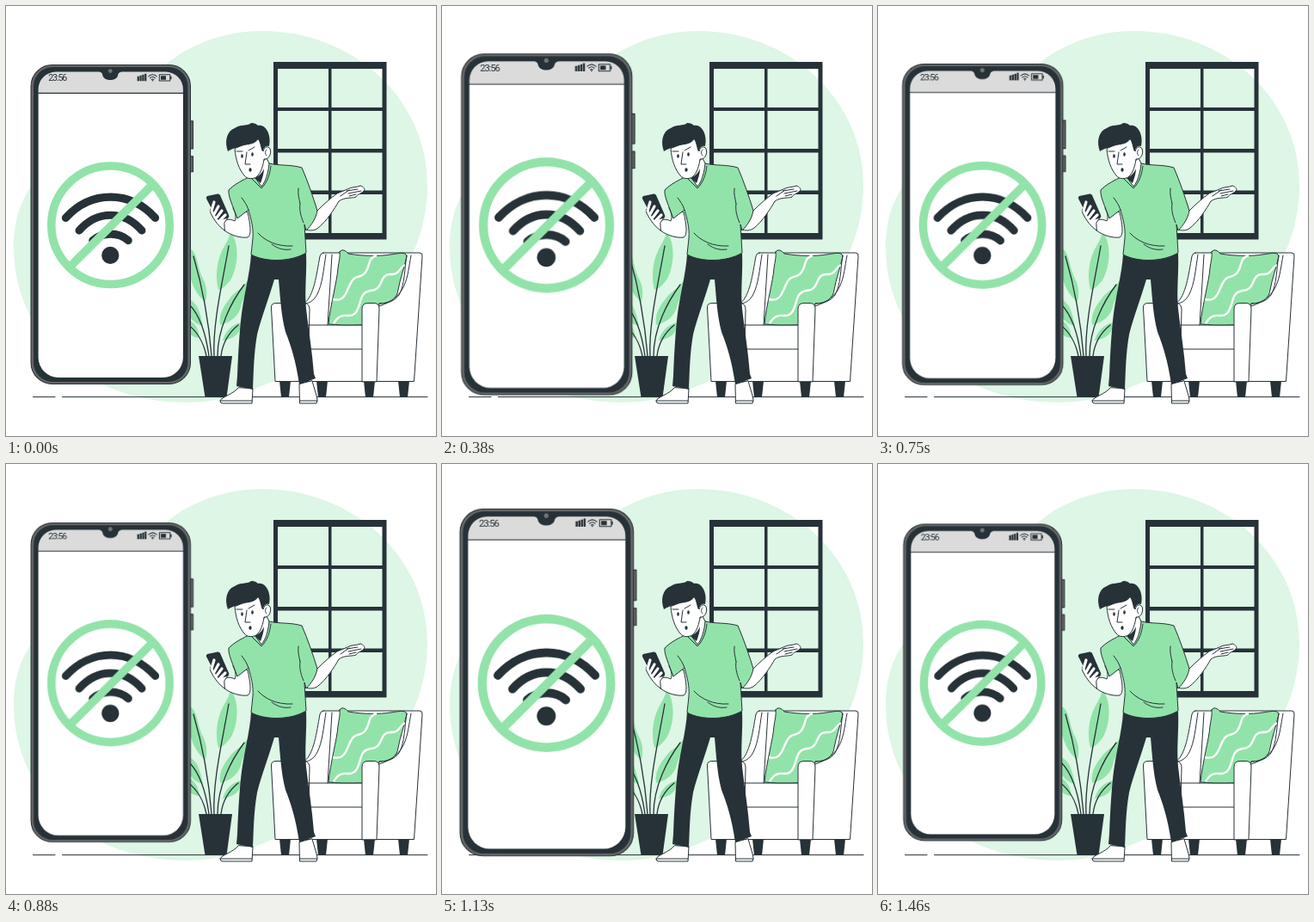
An HTML page that plays this animation: 500x500 px, repeating every 1.5 s.

```html
<!DOCTYPE html>
<html lang="en">
<head>
<meta charset="utf-8">
<title>No connection</title>
<style>
  html, body { margin: 0; width: 100%; height: 100%; overflow: hidden; background: #fff; }
  svg { display: block; width: 100vw; height: 100vh; }
  .g { fill: #92e3a9; }
  .d { fill: #263238; }
  .w { fill: #fff; }
  .o { stroke: #263238; stroke-width: 1; stroke-linejoin: round; stroke-linecap: round; }
  .l { fill: none; stroke: #263238; stroke-width: 1; stroke-linecap: round; stroke-linejoin: round; }
  .stem { stroke-width: 1.3; }
  .wave { fill: none; stroke: #fff; stroke-width: 2.4; }
  .finger { fill: none; stroke: #fff; stroke-width: 3.2; stroke-linecap: round; }
  .signal { fill: none; stroke: #263238; stroke-width: 9; stroke-linecap: round; }
  .ban { fill: none; stroke: #92e3a9; stroke-width: 9.5; }
  #phone { transform-origin: 121.5px 254px; }
  text { font: 10.5px Roboto, sans-serif; font-stretch: 75%; letter-spacing: -1.1px; fill: #263238; }
</style>
</head>
<body>
<svg viewBox="0 0 500 500">
  <path fill="#def6e5" d="M9 280C9 245 20 212 48 190C110 145 155 87 205 54C235 37 265 29 297 29C404 29 490 108 490 208C490 305 420 378 330 426C290 448 250 461 210 461C90 461 9 380 9 280Z"/>
  <path class="l" d="M31.500 454.600H57M65.500 454.600H490"/>

  <path id="window" class="d" fill-rule="evenodd" d="M311 65H442.500V271.500H311ZM316 73H375V118H316ZM378.500 73H437.500V118H378.500ZM316 122H375V166H316ZM378.500 122H437.500V166H378.500ZM316 170.500H375V214.500H316ZM378.500 170.500H437.500V214.500H378.500ZM316 219H375V264H316ZM378.500 219H437.500V264H378.500Z"/>

  <g id="plant">
    <g class="g">
      <path d="M261 262C271 275 271 300 262 317C256 326 250 330 247 330C243 315 245 296 252 283C256 275 260 270 261 262Z"/>
      <path d="M213 281C224 288 222 304 229 317C234 326 234 336 232 344C221 336 215 322 212 306Z"/>
      <path d="M282 318C283 332 275 340 273 350C270 361 261 368 249 371C247 357 254 348 261 339C267 331 275 329 282 318Z"/>
      <path d="M212 341C223 344 226 358 229 372C219 370 213 362 208 352Z"/>
      <path d="M211 365C219 367 224 375 225 386C218 386 213 382 208 374Z"/>
      <path d="M273 368C274 379 268 386 252 389C255 378 262 371 273 368Z"/>
    </g>
    <path class="l stem" d="M242 407C240 370 252 320 259 279M239 407C236 370 228 325 218 291M246 407C246 375 262 344 277 324M236 407C232 378 224 358 213 347M233 407C230 392 222 378 211 370M250 407C252 390 260 379 270 371"/>
    <path class="d" d="M224 407H263L256.500 455H231.500Z"/>
  </g>

  <g id="chair">
    <path class="d" d="M318 436H331L329 455H320ZM361 436H374L372 455H363ZM416 436H429L427 455H418ZM456 436H469L467 455H458Z"/>
    <path class="w o" d="M369 287H481Q484.500 287 484 291L474.500 436.500H313L308.500 351Q308 345.500 314 345.500H347C358 337 361 313 365 291Q366 287 369 287Z"/>
    <path class="l" d="M372 289C369 308 368 323 362 335C358 343 352 346 347 346M379 289L374 371M348 371H414M353 399H414M471 290C466 316 467 338 434 349"/>
    <path class="g o" d="M388 286C390 282 395 284 398 288C415 291 435 291 447 289C456 288 465 285 466 291C463 305 458 318 456 330C455 340 446 346 434 346L430 371C412 370 396 372 375 370C377 348 385 320 386 305C387 297 389 291 388 286Z"/>
    <path class="wave" d="M380 341C395 345 396 330 401 322C406 311 414 318 419 308C424 300 420 294 431 290M381 369C391 352 400 366 407 356C414 346 410 333 424 331C440 330 433 312 447 312C458 313 457 304 464 301"/>
    <path class="l" d="M466 290C463 308 464 323 457 336C452 343 444 346 434 346"/>
    <path class="w o" d="M414 436.500V352Q414 345.500 421 345.500H428Q434 345.500 434 352L431 436.500Z"/>
    <path class="l" d="M347 345.500Q353 346 353 353L351 436"/>
  </g>

  <g id="man">
    <path class="w o" d="M270 444C265 451 250 455 249 459Q249 462 252 462H286L287 445ZM341 440L341.500 462H361Q363 459 361 453L356 436Z"/>
    <path class="l" d="M249 459H286M341.500 459H362"/>
    <path class="d" d="M285 288H349C350 310 347 330 349 352C352 378 356 402 358 428L360 433L341 440C337 412 331 394 325 379C320 360 319 340 317 318H312C305 342 297 362 292 382C288 405 288 425 287 446L268 442L269 430C270 405 271 387 273 366C276 337 284 311 285 288Z"/>
    <path class="w o" d="M362 238C370 230 378 223 385 218L397 213C402 210 408 211 412 209C416 210 417 213 417 214C414 218 408 219 407 222C401 224 394 222 387 227C382 236 372 251 363 258C358 262 353 261 348 260Z"/>
    <path class="l" d="M396 215L409 213M398 218L413 215M399 221L407 219M389 221L399 214"/>
    <path class="w o" d="M264 235C267 241 268 246 266 250C260 247 255 248 252 252L254 261C262 267 273 270 281 269C286 267 284 253 281 240Z"/>
    <path class="g o" d="M284 198C275 203 267 206 259 214C258 221 264 233 269 247L282 237C285 248 288 258 287 270L285 289C301 298 331 298 349 287L347 254L349 261C355 255 360 248 362 238C357 222 351 204 344 188C331 184 317 186 306 183Z"/>
    <path class="l" d="M282 237C280 231 277 227 274 223M346 252C342 243 341 235 342 230M340 212C339 219 341 224 342 230M293 264C301 273 315 280 333 279M309 277C317 283 324 284 331 283"/>
    <path class="w o" d="M286 194L297 210C302 204 305 194 306 183L303 177Z"/>
    <path class="d" d="M289 200C294 198 298 194 300 189C300 195 298 200 296 206Z"/>
    <path class="l" d="M284 199L297 212C304 205 307 195 308 186"/>
    <path class="w o" d="M266 166C267 179 271 190 277 197C281 202 287 201 291 199C297 194 299 185 300 178C306 179 309 171 307 166C305 162 300 164 299 169L296 154Z"/>
    <path class="d" d="M258 169C254 158 256 146 266 142C273 137 281 140 285 136C289 136 291 137 293 139C302 137 309 150 306 163C302 162 300 165 298 169C296 165 296 159 293 155C288 163 278 160 270 164C265 165 261 167 258 169Z"/>
    <path class="l" d="M280 170L278 184L284 184M268 169L275 169M282 168L289 164M303 167C301 169 301 172 303 174"/>
    <g class="d">
      <ellipse cx="274.500" cy="174.500" rx="1.300" ry="2.200"/>
      <ellipse cx="286.500" cy="172.500" rx="1.300" ry="2.200"/>
      <ellipse cx="284" cy="190.500" rx="1.600" ry="2.200"/>
    </g>
    <path class="w o" d="M254 261C247 256 242 249 238 241C236 236 239 233 242 236L250 246L258 246L254 252Z"/>
    <path class="d" d="M234 221L246 218.500Q248 218 249 220L259 243Q260 246 257 247L249 249Q246 249 245 247L233 224Q232.500 222 234 221Z"/>
    <path class="finger" d="M239 238L242 228M242 242L247 233M245 246L251 238M249 249L255 243"/>
  </g>

  <g id="phone">
    <path fill="#666" class="o" d="M211 135H216.500V167H211ZM211 175.500H216.500V193.500H211Z"/>
    <rect x="30" y="70.500" width="183.500" height="367" rx="24.500" fill="#666" class="o"/>
    <rect class="d" x="33" y="73" width="177.500" height="362" rx="22"/>
    <path class="w" d="M38.500 103H205V407A23 23 0 0 1 182 430H61.500A23 23 0 0 1 38.500 407Z"/>
    <path fill="#dbdbdb" d="M38.500 103V98.500A20 20 0 0 1 58.500 78.500H185A20 20 0 0 1 205 98.500V103Z"/>
    <path class="l" d="M38.500 103H205"/>
    <path class="d" d="M106 77.500C111 78.500 112 80 112.500 82.500C114 89.500 128.500 89.500 130 82.500C130.500 80 132 78.500 137 77.500Z"/>
    <circle cx="121.300" cy="77.500" r="2.400" fill="#737373"/>
    <text x="50" y="89.200">23:56</text>
    <path class="d" d="M152.300 83.500H154.500V89H152.300ZM155.100 82.500H157.300V89H155.100ZM157.900 81.500H160.100V89H157.900ZM160.700 80.500H162.900V89H160.700ZM179.300 83H185.300V87.500H179.300ZM190.200 83.500H191.700V87H190.200Z"/>
    <path class="l" d="M165.300 83.800Q170 79.500 174.700 83.800M167 85.700Q170 83 173 85.700M168.700 87.400Q170 86.300 171.300 87.400M177.700 81.600H190V88.900H177.700Z"/>
    <circle class="d" cx="170" cy="88.500" r=".8"/>

    <path class="signal" d="M70 246.500C99 214.500 144 214.500 173 246.500M85.500 261C106 237.500 137 237.500 157.500 261M101 272.500C112 262.500 131 262.500 142 272.500"/>
    <circle class="d" cx="121.300" cy="289.500" r="10"/>
    <circle class="ban" cx="121.500" cy="254.700" r="68"/>
    <path class="ban" d="M74.500 303L170.500 207.500"/>
  </g>
</svg>
<script>
  const LOOP = 1500, STEPS = 36;
  // [step, scale] turning points of the double beat
  const beats = [[-.75, 1], [6.2, 1.1], [20.3, 1], [26.9, 1.1], [35.25, 1]];

  function scaleAt(step) {
    const i = beats.findIndex(b => b[0] > step);
    const [a, from] = beats[i - 1], [b, to] = beats[i];
    return from + (to - from) * (step - a) / (b - a);
  }

  const frames = Array.from({ length: STEPS }, (_, k) => ({
    offset: Math.round(k * LOOP / STEPS / 10) * 10 / LOOP,
    transform: `scale(${scaleAt(k)})`,
    easing: 'step-end'
  }));
  frames.push({ offset: 1, transform: `scale(${scaleAt(0)})` });

  document.getElementById('phone').animate(frames, { duration: LOOP, iterations: Infinity });
</script>
</body>
</html>
```
